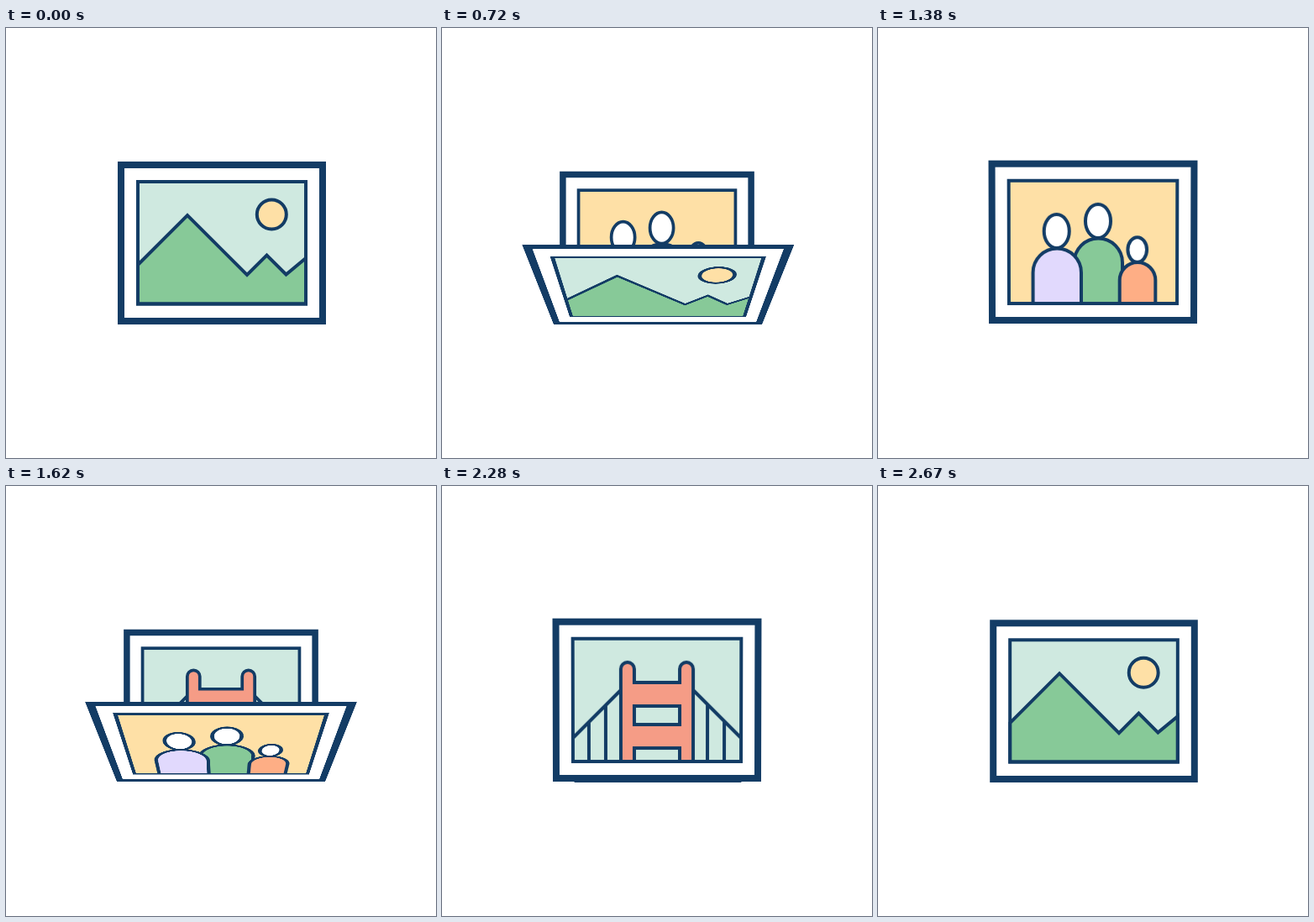
An HTML page for the animation above (2700 ms loop, 512x512 px).

```html
<!DOCTYPE html>
<html lang="en">
<head>
<meta charset="utf-8">
<title>Picture frames</title>
<style>
  html, body { margin: 0; width: 100%; height: 100%; overflow: hidden; background: #fff; }
  #stage { position: relative; width: 512px; height: 512px; overflow: hidden; perspective: 720px; perspective-origin: 256px 255px; }
  svg { position: absolute; left: 0; top: 0; width: 512px; height: 512px; stroke: #133c65; stroke-width: 4; stroke-miterlimit: 10; }
</style>
</head>
<body>
<div id="stage"></div>
<script>
const SKY = '#cfe9e0', GREEN = '#87c998', SAND = '#fee0a6', LILAC = '#e1d9fd', ORANGE = '#feae85', CORAL = '#f59c86';
const HOLD = 450, MOVE = 450, STEP = HOLD + MOVE;

const path = (d, fill = 'none') => `<path d="${d}" fill="${fill}"/>`;
const oval = (x, y, rx, ry, fill) => `<ellipse cx="${x}" cy="${y}" rx="${rx}" ry="${ry}" fill="${fill}"/>`;
const rect = (x, y, w, h, fill, line) =>
  `<rect x="${x}" y="${y}" width="${w}" height="${h}" fill="${fill}" stroke-width="${line}"/>`;

// A round-topped body standing on the lower edge of the picture.
const body = (x, top, r, fill) =>
  path(`M${x - r} 328V${top + r}a${r} ${r} 0 0 1 ${2 * r} 0V328`, fill);

const landscape =
  path('M157 282L216 223L287 294L310.5 270.5L333.5 293.5L357 274V328.5H157Z', GREEN) +
  oval(316.3, 222, 17.5, 17.5, SAND);

const family =
  body(262.3, 250.5, 28.7, GREEN) + oval(262, 230, 15, 20, '#fff') +
  body(213.3, 262.5, 28.7, LILAC) + oval(212.8, 242, 15, 20, '#fff') +
  body(309, 279, 21.3, ORANGE) + oval(308.7, 264, 11.3, 14.8, '#fff');

const hanger = (x, y) => path(`M${x} ${y}V328`);
const bridge =
  path('M213 243L156 300M299 243L356 300') +
  hanger(175, 281) + hanger(195, 261) + hanger(316, 260) + hanger(336, 280) +
  path('M213 328V218a8 8 0 0 1 16 0V234H283V218a8 8 0 0 1 16 0V328H283V312H229V328Z' +
       'M229 262V284H283V262Z', CORAL);

const pictures = [
  { shift: 1, h: 145.5, back: SKY, art: landscape, limit: 83.5 },
  { shift: 0, h: 146, back: SAND, art: family, limit: 82.3 },
  { shift: 0, h: 146, back: SKY, art: bridge, limit: 82.3 }
];

const stage = document.getElementById('stage');
stage.innerHTML = pictures.map(({ shift: s, h, back, art }) =>
  `<svg viewBox="0 0 512 512" style="transform-origin:${256 + s}px ${352 + s}px">` +
  rect(136 + s, 162 + s, 240, 186, '#fff', 8) +
  rect(156 + s, 182 + s, 200, h, back, 0) + art +
  rect(156 + s, 182 + s, 200, h, 'none', 4) + '</svg>').join('');
const views = [...stage.children];

// cubic-bezier(.42, 0, .58, 1)
function ease(u) {
  if (u <= 0 || u >= 1) return u <= 0 ? 0 : 1;
  let lo = 0, hi = 1, s;
  for (let i = 0; i < 30; i++) {
    s = (lo + hi) / 2;
    const x = 3 * (1 - s) * (1 - s) * s * 0.42 + 3 * (1 - s) * s * s * 0.58 + s * s * s;
    if (x < u) lo = s; else hi = s;
  }
  return s * s * (3 - 2 * s);
}

function draw(ms) {
  const t = ms % (STEP * pictures.length);
  const front = Math.floor(t / STEP), next = (front + 1) % pictures.length;
  const p = ease((t % STEP - HOLD) / MOVE), angle = 90 * p;
  views.forEach((view, i) => {
    const shown = i === front ? angle < pictures[i].limit : i === next && p > 0;
    view.style.visibility = shown ? 'visible' : 'hidden';
    view.style.zIndex = i === front ? 2 : 1;
    view.style.transform = p === 0 ? 'none' : i === front ? `rotateX(${-angle}deg)` : `scale(${0.8 + 0.2 * p})`;
  });
}

const start = performance.now();
function tick() {
  draw(performance.now() - start);
  requestAnimationFrame(tick);
}
tick();
</script>
</body>
</html>
```
